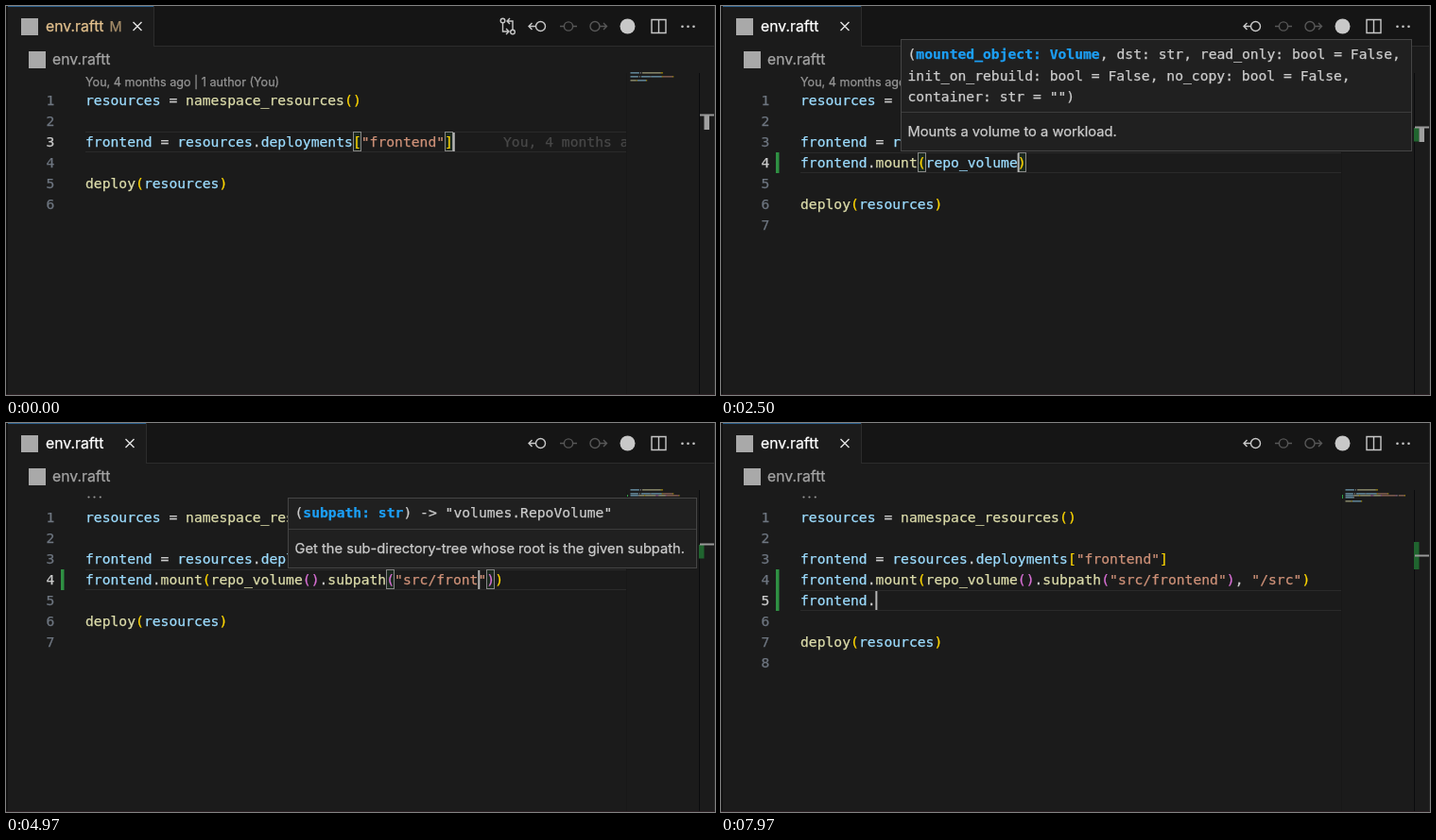
Recreate the animation shown at these times as an HTML page with a canvas. Size 750 px wide and 412 px high, loop 8000 ms.

```html
<!DOCTYPE html>
<html lang="en">
<head>
<meta charset="utf-8">
<title>Code editor</title>
<style>
  html, body { margin: 0; width: 100%; height: 100%; overflow: hidden; background: #1b1b1b; }
  canvas { display: block; width: 750px; height: 412px; }
</style>
</head>
<body>
<canvas id="stage"></canvas>
<script>
const W = 750, H = 412, LOOP = 8000;
const SIZE = 14.68, CHAR = 8.84, ROW = 22, LEFT = 84, EDGE = 657;
const MONO = '"DejaVu Sans Mono", monospace';
const SANS = 'Inter, sans-serif';
const BG = '#1b1b1b', LINE = '#2c2c2c', TEXT = '#cccccc';

const canvas = document.getElementById('stage');
const c = canvas.getContext('2d');
const ratio = window.devicePixelRatio || 1;
canvas.width = W * ratio;
canvas.height = H * ratio;

const HEAD = 'resources = namespace_resources()\n\nfrontend = resources.deployments["frontend"]';
const TAIL = '\n\ndeploy(resources)\n';

// Keystrokes: text, time of first key, time of last key
const KEYS = [
  ['\n', 470], ['frontend.', 600, 1040], ['mount', 1380, 1700], ['(', 1850],
  ['repo_volume', 2090, 2470], ['(', 2640], [')', 2780], ['.', 2900],
  ['subpath', 2990, 3290], ['(', 3400], ['"', 4050], ['src/frontend', 4290, 5220],
  ['"', 5420], [')', 5520], [', ', 5600, 5680], ['"', 5760], ['/src', 6080, 6380],
  ['"', 6520], [')', 6620], ['\n', 6740], ['frontend', 6900, 7760], ['.', 7910]
];

const ARGS = 'mounted_object: Volume';
const MOUNT_DOC = 'Mounts a volume to a workload.';
const HINTS = [
  { from: 1900, to: 3760, x: 190, y: 35, w: 541, bold: ARGS, doc: MOUNT_DOC, rows: [
    '(' + ARGS + ', dst: str, read_only: bool = False,',
    'init_on_rebuild: bool = False, no_copy: bool = False,',
    'container: str = "")'] },
  { from: 3760, to: 5520, x: 298, y: 79, w: 433, bold: 'subpath: str',
    doc: 'Get the sub-directory-tree whose root is the given subpath.',
    rows: ['(subpath: str) -> "volumes.RepoVolume"'] },
  { from: 5520, to: 6640, x: 225, y: 35, w: 524, bold: 'dst: str', doc: MOUNT_DOC, rows: [
    '(' + ARGS + ', dst: str, read_only: bool =',
    'False, init_on_rebuild: bool = False, no_copy: bool =',
    'False, container: str = "")'] }
];

const LISTS = [
  { from: 1130, to: 1720, line: 4, col: 9, items: 'mount name image env ports labels volumes' },
  { from: 2130, to: 2490, line: 4, col: 15,
    items: 'repo_volume resources repr reversed frontend deploy namespace_resources print range' },
  { from: 2940, to: 3310, line: 4, col: 29,
    items: 'subpath name path size mode owner group labels type' },
  { from: 6940, to: 7420, line: 5, col: 0, items: 'frontend float fail False' }
];

const active = (list, t) => list.find(e => t >= e.from && t < e.to);
const lineTop = n => 67 + ROW * n;

function rect(x, y, w, h, color) {
  c.fillStyle = color;
  c.fillRect(x, y, w, h);
}

function frame(x, y, w, h, color) {
  c.strokeStyle = color;
  c.lineWidth = 1;
  c.strokeRect(x + 0.5, y + 0.5, w - 1, h - 1);
}

// A hairline stroke gives the slightly heavy look of smoothed text
function text(s, x, y, color, size = SIZE, font = MONO, weight = 400) {
  c.font = `${weight} ${size}px ${font}`;
  c.fillStyle = c.strokeStyle = color;
  c.lineWidth = 0.25;
  c.fillText(s, x, y);
  c.strokeText(s, x, y);
}

function path(color, width, ...lines) {
  c.strokeStyle = color;
  c.lineWidth = width;
  c.beginPath();
  for (const pts of lines) {
    for (let i = 0; i < pts.length; i += 2) c[i ? 'lineTo' : 'moveTo'](pts[i], pts[i + 1]);
  }
  c.stroke();
}

function ring(x, y, r, color) {
  c.strokeStyle = color;
  c.lineWidth = 1.4;
  c.beginPath();
  c.arc(x, y, r, 0, 7);
  c.stroke();
}

function dot(x, y, r, color) {
  c.fillStyle = color;
  c.beginPath();
  c.arc(x, y, r, 0, 7);
  c.fill();
}

function typed(t) {
  let out = '';
  for (const [s, from, to = from] of KEYS) {
    if (t < from) break;
    const step = s.length > 1 ? (to - from) / (s.length - 1) : 1;
    out += s.slice(0, 1 + Math.floor((t - from) / step));
  }
  return out;
}

// Brackets and quotes the editor closes by itself
function closers(s) {
  const open = [];
  for (const ch of s) {
    const last = open[open.length - 1];
    if (ch === '"') last === '"' ? open.pop() : open.push('"');
    else if (ch === '(') open.push(')');
    else if (ch === ')') open.pop();
  }
  return open.reverse().join('');
}

function tokens(line) {
  const out = [];
  let depth = 0;
  for (const m of line.matchAll(/"[^"]*"?|\w+|[()[\]]|[^\s\w]/g)) {
    const s = m[0], next = line[m.index + s.length];
    let color = TEXT;
    if (s[0] === '"') color = '#ce9178';
    else if (/\w/.test(s)) color = next === '(' ? '#dcdcaa' : '#9cdcfe';
    else if (/[(\[]/.test(s)) color = depth++ % 2 ? '#da70d6' : '#ffd700';
    else if (/[)\]]/.test(s)) color = --depth % 2 ? '#da70d6' : '#ffd700';
    out.push({ s, col: m.index, color });
  }
  return out;
}

// Pair closed just before the caret, else the innermost pair around it
function bracketPair(line, caret) {
  const open = [];
  let around = null;
  for (let i = 0; i < line.length; i++) {
    if (/[(\[]/.test(line[i])) open.push(i);
    else if (/[)\]]/.test(line[i])) {
      const pair = [open.pop(), i];
      if (i === caret - 1) return pair;
      if (!around && pair[0] < caret && caret <= i) around = pair;
    }
  }
  return around;
}

function toolbar(modified) {
  const on = '#c8c8c8', dim = '#575757';
  if (modified) {
    ring(525.5, 15.5, 2.3, on);
    ring(536, 27.5, 2.3, on);
    path(on, 1.4, [525.5, 18, 525.5, 27, 532, 27], [529, 24, 532, 27, 529, 30],
      [536, 25, 536, 16, 530, 16], [533, 13, 530, 16, 533, 19]);
  }
  ring(565.5, 21.5, 5, on);
  path(on, 1.4, [560.5, 21.5, 553, 21.5], [556.5, 18, 553, 21.5, 556.5, 25]);
  ring(595, 21.5, 4.6, dim);
  path(dim, 1.4, [586, 21.5, 590.4, 21.5], [599.6, 21.5, 604, 21.5]);
  ring(623, 21.5, 5, dim);
  path(dim, 1.4, [628, 21.5, 635.5, 21.5], [632, 18, 635.5, 21.5, 632, 25]);
  dot(657.5, 21.5, 8, on);
  path(on, 1.4, [683, 14.5, 698, 14.5, 698, 28.5, 683, 28.5, 683, 13.8], [690.5, 14.5, 690.5, 28.5]);
  for (const x of [715.5, 721.5, 727.5]) dot(x, 21.8, 1.3, on);
}

function header(modified) {
  const right = modified ? 157 : 149, x = right - 18;
  rect(0, 0, W, 43, '#151515');
  rect(right, 42, W - right, 1, LINE);
  rect(2, 0, right - 2, 43, BG);
  rect(2, 0, right - 2, 1, '#2b5f8c');
  rect(right - 1, 0, 1, 43, LINE);
  rect(16, 13, 18, 18, '#a9a9a9');
  text('env.raftt', 42, 27, modified ? '#e2c08d' : '#ffffff', 15.8, SANS);
  if (modified) text('M', 109.5, 27, '#a48c69', 14.5, SANS);
  path('#e4e4e4', 1.4, [x - 4.5, 17, x + 4.5, 26], [x + 4.5, 17, x - 4.5, 26]);
  toolbar(modified);
  rect(24, 48, 18, 18, '#a9a9a9');
  text('env.raftt', 49, 62.3, '#a4a4a4', 15.8, SANS);
}

function lens(t) {
  if (t < 3760) text('You, 4 months ago | 1 author (You)', LEFT, 84.5, '#959595', 12.6, SANS);
  else for (const x of [87.5, 93.5, 99.8]) dot(x, 78.5, 1.1, '#999999');
}

function minimap(lines, green) {
  c.globalAlpha = 0.65;
  lines.forEach((line, i) => {
    for (const k of tokens(line)) {
      rect(660.5 + k.col * 1.04, 70.2 + i * 2, k.s.length * 1.04, 1.3, k.color);
    }
  });
  c.globalAlpha = 1;
  if (green) rect(657, 76, 1, green * 2, '#2ea043');
}

function ruler(line, green, paired) {
  const y = [115, 128, 140][line - 3];
  rect(733, 71, 1, H - 71, '#0a0b0d');
  if (green) rect(733, green > 1 ? 126 : 129, 5.5, green > 1 ? 29 : 14.5, '#20652f');
  if (paired) rect(738.5, y + 1, 5.5, 15, '#a0a0a0');
  rect(734, y - 0.5, 15, 2, '#9a9a9a');
}

function hintBox(h) {
  rect(h.x, h.y, h.w, 154 - h.y, '#202020');
  frame(h.x, h.y, h.w, 154 - h.y, '#454545');
  rect(h.x + 1, 112, h.w - 2, 1, '#3c3c3c');
  h.rows.forEach((row, i) => {
    const x = h.x + 7.5, y = h.y + 21.2 + i * 22.4, at = row.indexOf(h.bold);
    if (at < 0) return text(row, x, y, TEXT);
    const end = at + h.bold.length;
    text(row.slice(0, at), x, y, TEXT);
    text(h.bold, x + at * CHAR, y, '#1c9ff5', SIZE, MONO, 700);
    text(row.slice(end), x + end * CHAR, y, TEXT);
  });
  text(h.doc, h.x + 7.5, 138.2, TEXT, 14.7, SANS);
}

function suggestBox(l) {
  const items = l.items.split(' '), w = 524;
  const x = Math.min(LEFT + l.col * CHAR - 32, 731 - w), y = lineTop(l.line + 1);
  const h = items.length * ROW + 10;
  rect(x, y, w, h, '#202020');
  rect(x + 1, y + 5, w - 2, ROW, '#04395e');
  frame(x, y, w, h, '#454545');
  items.forEach((s, i) => {
    const top = y + 5 + i * ROW;
    frame(Math.round(x) + 9, top + 6, 11, 11, '#b180d7');
    text(s, x + 32, top + 16, TEXT);
  });
}

function draw(t) {
  const input = typed(t), before = HEAD + input;
  const lines = (before + closers(input) + TAIL).split('\n');
  const above = before.split('\n');
  const row = above.length, caret = above[row - 1].length;
  const green = t < 640 ? 0 : row - 3;
  const pair = bracketPair(lines[row - 1], caret);
  const hint = active(HINTS, t), list = active(LISTS, t);

  c.setTransform(ratio, 0, 0, ratio, 0, 0);
  rect(0, 0, W, H, BG);
  header(t < 1500);
  lens(t);

  const top = lineTop(row);
  rect(LEFT, top, EDGE - LEFT, 1, '#2a2a2a');
  rect(LEFT, top + ROW - 1, EDGE - LEFT, 1, '#2a2a2a');
  if (green) rect(58, lineTop(4), 3.5, green * ROW, '#2f9043');
  if (pair) {
    for (const col of pair) {
      const x = Math.round(LEFT + col * CHAR);
      rect(x, top, 9, ROW - 1, '#1c291f');
      frame(x, top, 9, ROW - 1, '#888888');
    }
  }

  lines.forEach((line, i) => {
    const y = lineTop(i + 1) + 15.8;
    text(String(i + 1), 51.3 - CHAR, y, i + 1 === row ? TEXT : '#6e7681');
    for (const k of tokens(line)) text(k.s, LEFT + k.col * CHAR, y, k.color);
  });

  if (row === 3) {
    c.save();
    c.beginPath();
    c.rect(0, 0, EDGE, H);
    c.clip();
    text('You, 4 months ago', 526, top + 15.8, '#484848');
    c.restore();
  }
  rect(LEFT + caret * CHAR - 0.2, top + 1, 2, ROW - 2, '#b4b4b4');

  rect(EDGE - 1, 71, 1, H - 71, '#181818');
  minimap(lines, green);
  ruler(row, green, pair && hint !== HINTS[1]);
  if (list) suggestBox(list);
  if (hint) hintBox(hint);

  rect(0, 0, 2, H, '#111111');
  rect(W - 1, 0, 1, H, '#2a2a2a');
  rect(0, H - 1, W, 1, '#2c2024');
}

const start = performance.now();
function tick() {
  draw((performance.now() - start) % LOOP);
  requestAnimationFrame(tick);
}
tick();
</script>
</body>
</html>
```
